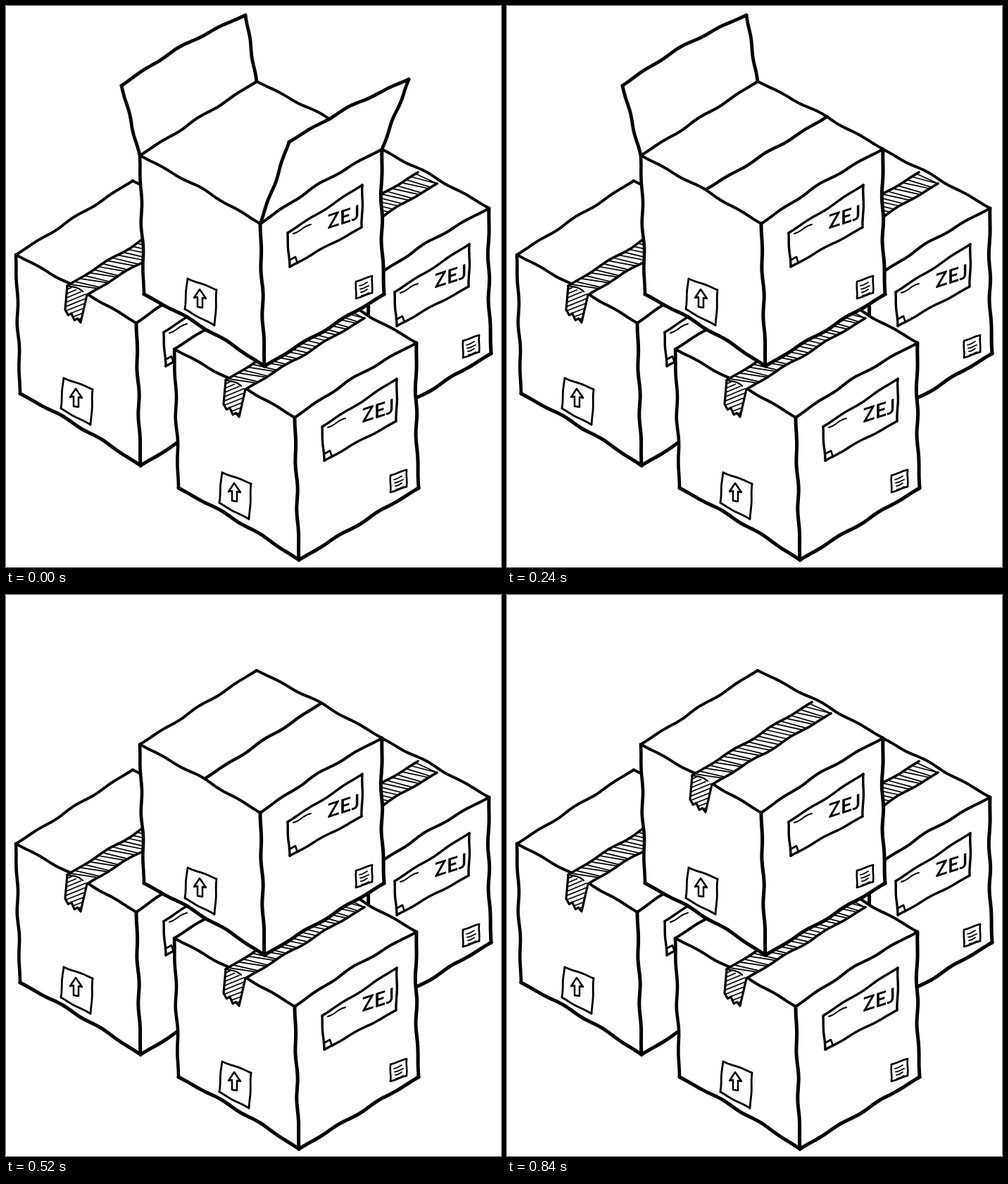
An HTML page for the animation above (1.6 s loop, 703 px wide and 796 px high).

```html
<!DOCTYPE html>
<html lang="en">
<head>
<meta charset="utf-8">
<title>Packing boxes</title>
<style>
  html, body { margin: 0; width: 100%; height: 100%; overflow: hidden; background: #fff; }
  svg { display: block; width: 100%; height: 100%; }
  path { fill: none; stroke: #000; stroke-linecap: round; stroke-linejoin: round; }
  text { font: 27px Lato, "Open Sans", sans-serif; letter-spacing: 1px; stroke: #000; stroke-width: .9px; }
</style>
</head>
<body>
<svg viewBox="0 0 703 796">
  <defs>
    <g id="box"></g>
    <g id="tape"></g>
  </defs>
  <g id="stack"></g>
  <use href="#box"/>
  <g id="lid"></g>
</svg>
<script>
const el = id => document.getElementById(id);
const add = (a, b) => [a[0] + b[0], a[1] + b[1]];
const mix = (a, b, k) => [a[0] + (b[0] - a[0]) * k, a[1] + (b[1] - a[1]) * k];
const clamp = v => Math.max(0, Math.min(1, v));
const range = n => [...Array(n).keys()];

const poly = (list, close) =>
  'M' + list.map(p => p.map(v => v.toFixed(1)).join(' ')).join('L') + (close ? 'Z' : '');
const path = (d, w, fill = 'none') =>
  `<path d="${d}" style="stroke-width:${w};fill:${fill}"/>`;

// Hand-drawn line from a to b: a bend to one side plus a slow tremble
function pen(a, b, bow = 0, amp = 1.2) {
  const dx = b[0] - a[0], dy = b[1] - a[1], len = Math.hypot(dx, dy) || 1;
  const n = Math.max(4, Math.round(len / 6));
  return range(n + 1).map(i => {
    const k = i / n;
    const off = Math.sin(Math.PI * k) * (bow + amp * Math.sin(k * len / 11 + 2));
    return add(mix(a, b, k), [-dy / len * off, dx / len * off]);
  });
}
const line = (a, b, w, bow, amp) => path(poly(pen(a, b, bow, amp)), w);

// Corners: left, front, right and back of the top, then the bottom ones
const L = [190, 212], F = [361, 309], R = [534, 203], B = [356, 107];
const LB = [196, 409], FB = [367, 511], RB = [537, 409];

function box() {
  const shell = [pen(L, B), pen(B, R, -2), pen(R, RB, 2), pen(RB, FB),
    pen(FB, LB, 3), pen(LB, L)];
  const widths = [4, 4, 5, 5, 5, 4.6];
  const label = [[400, 322], [506, 254], [505, 314], [403, 370]];
  const ring = (c, w) => c.map((p, i) => line(p, c[(i + 1) % c.length], w, 0, .9)).join('');
  const stamp = range(4).map(i =>
    line([502 + i, 397 + i * 4.6], [513 + i % 2 * 2, 392 + i * 5], 1.8, 0, 1)).join('');
  return path(poly(shell.flat(), true), 0, '#fff')
    + shell.map((e, i) => path(poly(e), widths[i])).join('')
    + line(L, F, 4, -2) + line(F, R, 4, -4) + line(F, FB, 5)
    + ring(label, 3.4)
    + path(poly([[402, 361], [411, 356], [414, 365]]), 2.6)
    + line([408, 323], [433, 310], 2, 0, 2)
    + ring([[497, 391], [520, 383], [520, 407], [497, 415]], 2.6) + stamp
    + ring([[258, 387], [299, 403], [296, 453], [254, 430]], 2.8)
    + path(poly([[267, 414], [275, 402], [284, 415], [279, 414], [279, 428], [272, 427], [272, 413]], true), 2.5)
    + '<text transform="translate(457 316) skewY(-18)">ZEJ</text>';
}

// reach: part of the top covered; drop: part of the hanging end
function tape(reach, drop, loose) {
  const left = u => mix(loose ? [433, 147] : [433, 152], [263, 256], u);
  const right = u => mix(loose ? [467, 164] : [460, 168], [291, 269], u);
  const hangL = v => add(left(1), [-3 * v, 34 * v]);
  const hangR = v => add(right(1), [-9 * v, 39 * v]);
  const endL = drop ? hangL(drop) : left(reach), endR = drop ? hangR(drop) : right(reach);
  const teeth = range(6).map(k =>
    add(mix(endL, endR, k / 5), [0, k % 5 ? (k % 2 ? 4 : -2) : 0]));
  const sideL = pen(left(0), left(reach)), sideR = pen(right(0), right(reach));

  let hatch = '';
  for (let u = .02; u < reach; u += .04) {
    const v = u - .06 + .012 * Math.sin(u * 75);
    hatch += poly([left(u), right(Math.max(0, v))]);
  }
  for (let c = .15; drop && c < 1.7; c += .18) {
    const at = k => mix(hangL((c - .75 * k) * drop), hangR((c - .75 * k) * drop), k);
    hatch += poly([at(Math.max(0, (c - 1) / .75)), at(Math.min(1, c / .75))]);
  }
  return path(poly([...sideL, ...teeth, ...[...sideR].reverse()], true), 0, '#fff')
    + path(hatch, loose ? 2.1 : 1.7)
    + path(poly(sideL), 3.6) + path(poly(sideR), 3.6)
    + (drop ? line(left(1), add(right(1), [-6, -5]), 2.2, -2) : '')
    + path(poly([left(reach), ...teeth, right(reach)]), 3.2);
}

// Parabola through a at 0, m at k and b at 1
const arc = (a, k, m, b, p) => a.map((v, i) => {
  const bend = (m[i] - mix([v], [b[i]], k)[0]) / (k * (1 - k));
  return v + (b[i] - v) * p + bend * p * (1 - p);
});

function flap(h1, c1, c2, h2, bow) {
  return path(poly([h1, c1, c2, h2], true), 0, '#fff')
    + line(h1, c1, 4.8) + line(c1, c2, 4.8, bow) + line(c2, h2, 4.8);
}

function rightFlap(p, seamEnd) {
  if (p === 1) return line([283, 260], seamEnd, 4.4);
  return flap(F, add(F, arc([41, -116], 1 / 3, [5, -104], [-78, -49], p)),
    add(R, arc([38, -99], 1 / 3, [4, -114], [-79, -46], p)), R, -4 * (1 - p))
    + line(F, R, 4, -4);
}

function leftFlap(p) {
  if (p === 1) return '';
  return flap(L, add(L, arc([-26, -99], 4 / 7, [65, -22], [93, 48], p)),
    add(B, arc([-16, -94], 4 / 7, [51, -10], [91, 47], p)), B, -6 * (1 - p))
    + line(L, B, 4);
}

function lid(t) {
  let out = '';
  if (t < 840) {
    out += rightFlap(clamp(t / 240), t > 240 ? [447, 154] : [455, 157]);
    out += leftFlap(clamp((t - 240) / 280));
  }
  if (t >= 600) out += tape(clamp((t - 560) / 160), clamp((t - 720) / 120), t < 840);
  return out;
}

el('box').innerHTML = box();
el('tape').innerHTML = tape(1, 1, false);
el('stack').innerHTML = [[-176, 141], [152, 84], [49, 275]].map(([x, y]) =>
  `<g transform="translate(${x} ${y})"><use href="#box"/><use href="#tape"/></g>`).join('');

const LOOP = 1600, STEP = 40;
let shown = -1;
function draw(now) {
  const t = Math.floor(now % LOOP / STEP) * STEP;
  if (t !== shown) el('lid').innerHTML = lid(shown = t);
  requestAnimationFrame(draw);
}
draw(performance.now());
</script>
</body>
</html>
```
